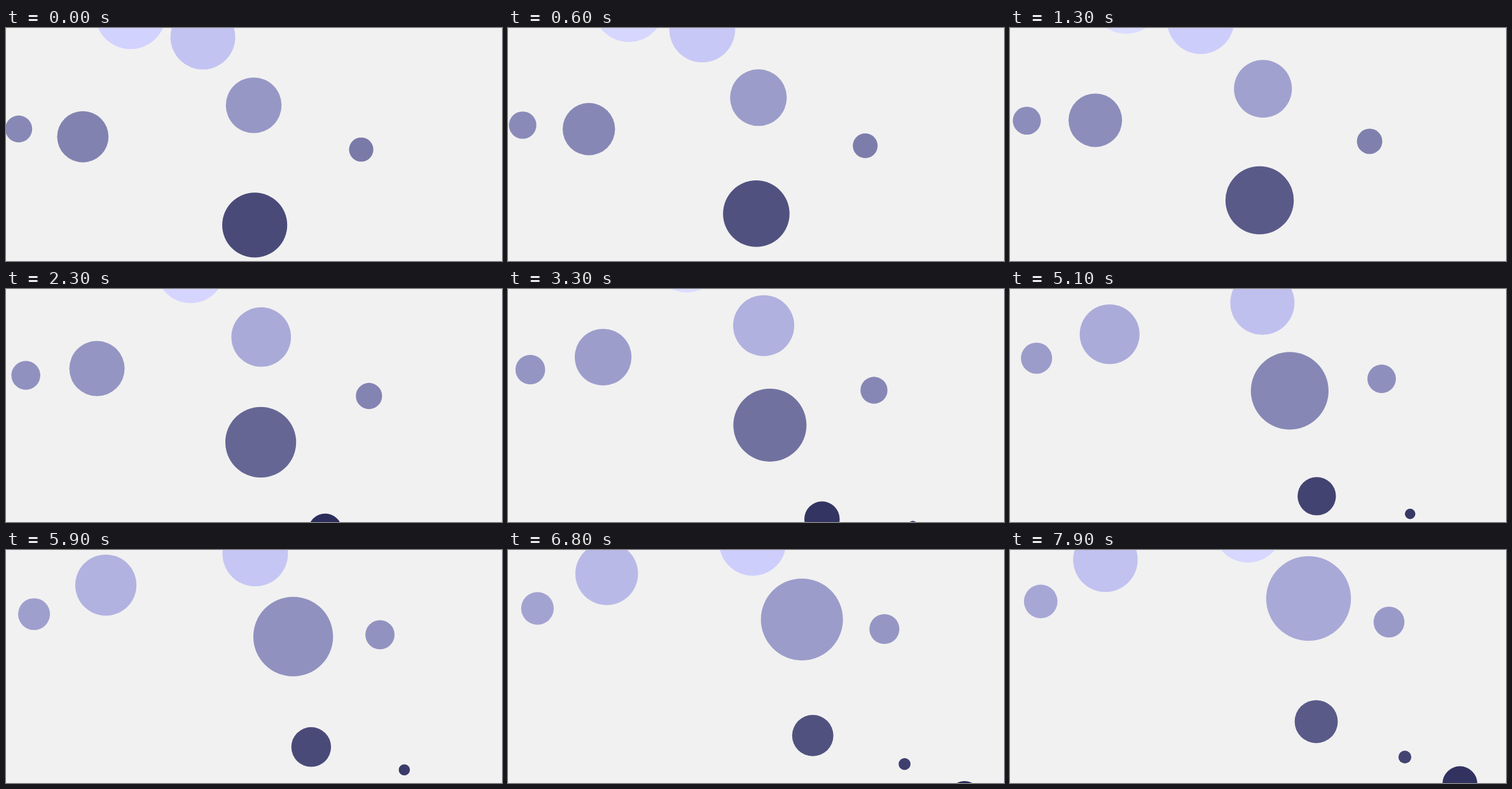
Write an HTML page that moves like this. It is 780x367 px and loops after 8000 ms.

```html
<!DOCTYPE html>
<html lang="en">
<head>
<meta charset="utf-8">
<title>Rising bubbles</title>
<style>
  html, body { margin: 0; width: 100%; height: 100%; overflow: hidden; background: #f1f1f1; }
  svg { display: block; width: 780px; height: 367px; }
</style>
</head>
<body>
<svg id="stage" viewBox="0 0 780 367"></svg>
<script>
const LOOP = 8000, STEP = 100, HEIGHT = 367;
const PAUSE_STEP = 25; // the bubbles rest for one step here

// x: axis of the sway, y and r: at the start, speed: pixels per step
const bubbles = [
  { x: 177.8, y: -22.2, r: 55.5, speed: 2 },
  { x: 276.9, y: 14.3, r: 51, speed: 2 },
  { x: 362.1, y: 121.7, r: 43.8, speed: 2 },
  { x: 9.8, y: 159, r: 21.2, speed: 1 },
  { x: 117.1, y: 171.3, r: 40.4, speed: 2 },
  { x: 565.6, y: 191.5, r: 19.1, speed: 1 },
  { x: 430.4, y: 310.4, r: 51.1, speed: 3 },
  { x: 519.2, y: 426.3, r: 23.5, speed: 2 },
  { x: 657.8, y: 404.2, r: 4.9, speed: 1 },
  { x: 730.5, y: 524, r: 17, speed: 2 }
];

const stage = document.getElementById("stage");
for (const bubble of bubbles) {
  bubble.node = document.createElementNS("http://www.w3.org/2000/svg", "circle");
  stage.append(bubble.node);
}

const sway = y => 40 * Math.cos((y - 60.5) / 75);

function shade(y) {
  const tone = Math.round(200.5 - 150 * y / HEIGHT);
  return `rgb(${tone}, ${tone}, ${Math.min(255, tone + 47)})`;
}

function draw(time) {
  const step = Math.floor((time % LOOP) / STEP);
  const moved = step < PAUSE_STEP ? step : step - 1;
  for (const { x, y, r, speed, node } of bubbles) {
    const rise = speed * moved;
    const cy = y - rise;
    node.setAttribute("cx", x + sway(cy));
    node.setAttribute("cy", cy);
    node.setAttribute("r", r + rise / 15);
    node.setAttribute("fill", shade(cy));
  }
}

const start = performance.now();
function tick() {
  draw(performance.now() - start);
  requestAnimationFrame(tick);
}
tick();
</script>
</body>
</html>
```
